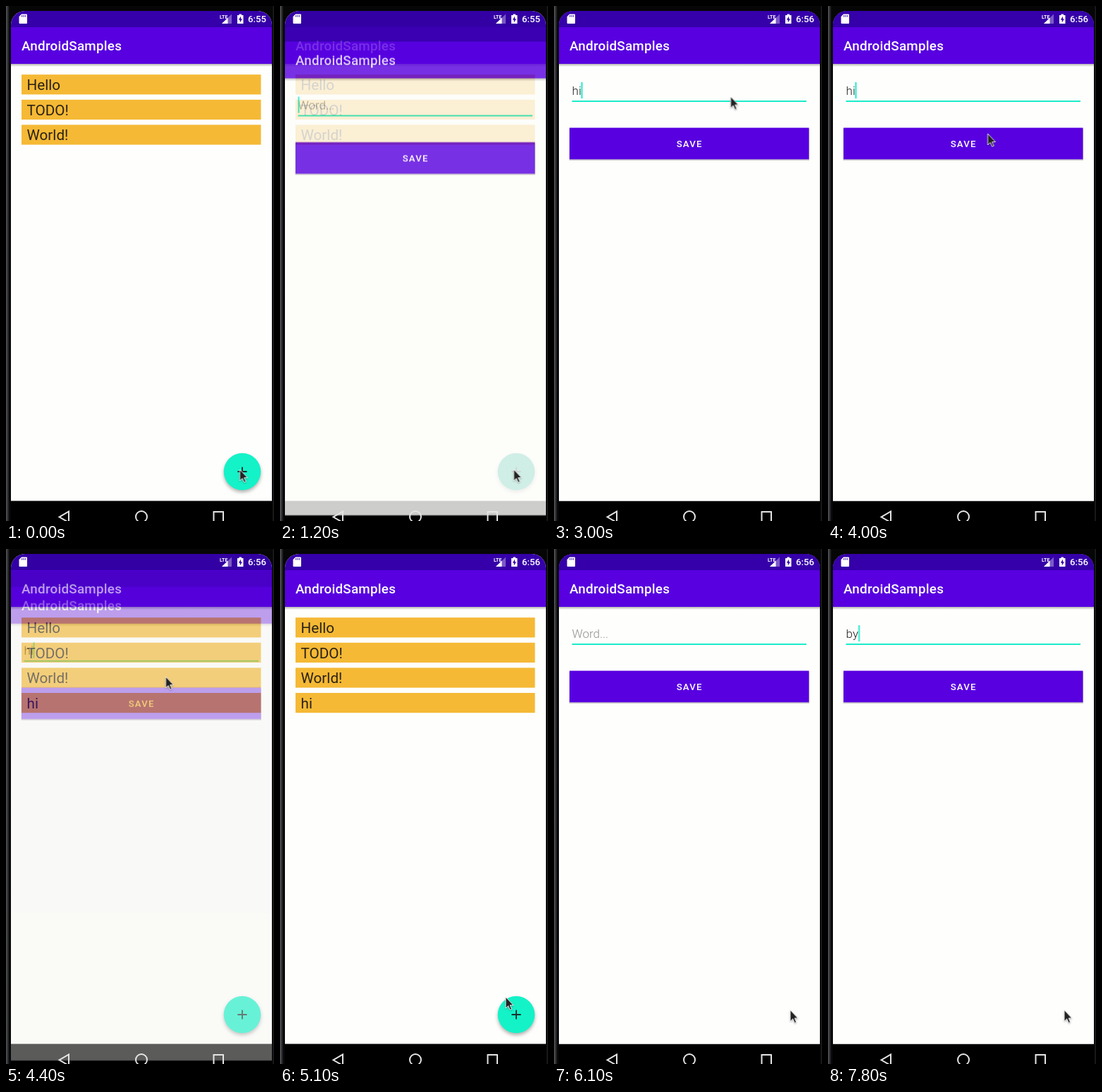
Recreate the animation shown at these times as an HTML page. Size 380 px wide and 730 px high, loop 8000 ms.

```html
<!DOCTYPE html>
<html lang="en">
<head>
<meta charset="utf-8">
<title>Word list app</title>
<style>
html, body { margin: 0; width: 100%; height: 100%; overflow: hidden; background: #060607; }
svg { display: block; width: 380px; height: 730px; font-family: Roboto, sans-serif; }

.title { font-size: 18.84px; font-weight: 500; letter-spacing: .0125em; fill: #fff; }
.item rect { fill: #f5b935; }
.item text { font-size: 20.7px; fill: #2a2212; }
.field { font-size: 16.96px; font-weight: 300; fill: #222; }
.hint { fill: #8f918e; }
.save { font-size: 13.2px; font-weight: 500; letter-spacing: .0892em; fill: #fff; }
.clock { font-size: 13.2px; font-weight: 500; fill: #fff; }
.lte { font-size: 7px; font-weight: 700; fill: #fff; }
.fab { filter: drop-shadow(0 3px 2.5px rgba(0, 0, 0, .3)); }

/* Everything changes in hard steps of 100 ms; 1.25% = 100 ms */
.editor, .caret, .hint, .h, .i, .b, .y, .new, .veil, .press, .lift, .before, .after, .pointer {
  animation: 8s step-end infinite;
}
.editor { animation-name: slide; opacity: 0; }
.caret { animation-name: caret; }
.hint { animation-name: hint; }
.h { animation-name: h; }
.i { animation-name: i; }
.b { animation-name: b; }
.y { animation-name: y; }
.h, .i, .b, .y, .new, .after { visibility: hidden; }
.new { animation-name: added; }
.veil { animation-name: veil; opacity: 0; }
.press { animation-name: press; opacity: 0; }
.lift { animation-name: lift; opacity: .2; }
.before { animation-name: before; }
.after { animation-name: after; }
.pointer { animation-name: pointer; }

@keyframes slide {
  0% { opacity: 0; transform: none; }
  15% { opacity: .81; transform: translateY(20.5px); }
  16.25% { opacity: 1; transform: translateY(2.3px); }
  17.5% { transform: none; }
  53.75% { opacity: 1; transform: translateY(1.5px); }
  55% { opacity: .36; transform: translateY(23.7px); }
  56.25% { opacity: 0; transform: none; }
  71.25% { opacity: .67; transform: translateY(28px); }
  72.5% { opacity: .98; transform: translateY(3.7px); }
  73.75%, 100% { opacity: 1; transform: none; }
}
@keyframes caret {
  0% { opacity: 1; transform: none; }
  20% { opacity: 0; }
  26.25% { opacity: 1; }
  32.5% { transform: translateX(9px); }
  37.5% { transform: translateX(13px); }
  40% { opacity: 0; }
  46.25% { opacity: 1; }
  56.25% { transform: none; }
  76.25% { opacity: 0; }
  82.5% { opacity: 1; }
  88.75% { opacity: 0; }
  95% { opacity: 1; transform: translateX(9px); }
  97.5%, 100% { opacity: 1; transform: translateX(17.6px); }
}
@keyframes hint {
  0%, 56.25% { visibility: visible; }
  32.5%, 95%, 100% { visibility: hidden; }
}
@keyframes h {
  0%, 56.25%, 100% { visibility: hidden; }
  32.5% { visibility: visible; }
}
@keyframes i {
  0%, 56.25%, 100% { visibility: hidden; }
  37.5% { visibility: visible; }
}
@keyframes b { 95%, 100% { visibility: visible; } }
@keyframes y { 97.5%, 100% { visibility: visible; } }
@keyframes added { 50%, 100% { visibility: visible; } }
@keyframes before { 17.5%, 100% { visibility: hidden; } }
@keyframes after { 17.5%, 100% { visibility: visible; } }
@keyframes veil {
  0%, 16.25%, 56.25%, 72.5%, 100% { opacity: 0; }
  15%, 55%, 71.25% { opacity: .03; }
}
@keyframes press {
  0%, 17.5%, 73.75%, 100% { opacity: 0; }
  11.25%, 68.75% { opacity: .1; }
  12.5%, 70% { opacity: .2; }
  13.75%, 71.25% { opacity: .27; }
}
@keyframes lift {
  0%, 56.25%, 100% { opacity: .2; }
  51.25% { opacity: .28; }
  52.5% { opacity: .34; }
}
@keyframes pointer {
  0% { transform: translate(331.5px, 657px); }
  17.5% { transform: translate(315px, 540px); }
  18.75% { transform: translate(280px, 265px); }
  20% { transform: translate(260px, 141px); }
  22.5% { transform: translate(250.5px, 128.5px); }
  45% { transform: translate(249px, 133px); }
  46.25% { transform: translate(244px, 150px); }
  47.5% { transform: translate(236px, 168px); }
  48.75% { transform: translate(229px, 178px); }
  50% { transform: translate(226.5px, 181px); }
  58.75% { transform: translate(228px, 192px); }
  60% { transform: translate(240px, 260px); }
  61.25% { transform: translate(268px, 410px); }
  62.5% { transform: translate(300px, 560px); }
  63.75% { transform: translate(320px, 635px); }
  65% { transform: translate(329px, 662px); }
  66.25% { transform: translate(331px, 665px); }
  73.75%, 100% { transform: translate(335px, 653.5px); }
}
</style>
</head>
<body>
<svg viewBox="0 0 380 730">
  <defs>
    <clipPath id="glass"><rect x="7" y="7" width="370" height="760" rx="20"/></clipPath>
    <linearGradient id="edge">
      <stop offset="0" stop-color="#55575a"/>
      <stop offset=".45" stop-color="#333437"/>
      <stop offset="1" stop-color="#060607"/>
    </linearGradient>
    <linearGradient id="fade" x2="0" y2="1">
      <stop offset="0" stop-opacity=".3"/>
      <stop offset="1" stop-opacity="0"/>
    </linearGradient>
    <g id="page">
      <rect x="7" y="7" width="370" height="694.5" fill="#fefefc"/>
      <rect x="7" y="82" width="370" height="4" fill="url(#fade)"/>
      <rect x="7" y="7" width="370" height="23.5" fill="#3500a9"/>
      <rect x="7" y="30" width="370" height="52" fill="#5800e0"/>
      <text class="title" x="22" y="63">AndroidSamples</text>
    </g>
  </defs>

  <rect width="380" height="730" fill="#060607"/>
  <rect width="5" height="730" fill="url(#edge)"/>
  <rect x="378.5" width="1.5" height="730" fill="#1b1c1e"/>

  <g clip-path="url(#glass)">
    <rect x="7" y="7" width="370" height="723" fill="#000"/>

    <g>
      <use href="#page"/>
      <g class="item">
        <rect x="22" y="97.2" width="339.5" height="28.2"/>
        <text x="29.5" y="119">Hello</text>
      </g>
      <g class="item" transform="translate(0 35.6)">
        <rect x="22" y="97.2" width="339.5" height="28.2"/>
        <text x="29.5" y="119">TODO!</text>
      </g>
      <g class="item" transform="translate(0 71.2)">
        <rect x="22" y="97.2" width="339.5" height="28.2"/>
        <text x="29.5" y="119">World!</text>
      </g>
      <g class="item new" transform="translate(0 106.8)">
        <rect x="22" y="97.2" width="339.5" height="28.2"/>
        <text x="29.5" y="119">hi</text>
      </g>
      <circle class="fab" cx="335" cy="660" r="26.3" fill="#14f2c8"/>
      <circle class="press" cx="335" cy="660" r="26.3"/>
      <path d="M328.4 660h13.2M335 653.4v13.2" stroke="#15332c" stroke-width="1.9"/>
      <rect class="veil" x="7" y="7" width="370" height="694.5"/>
    </g>

    <g class="editor">
      <use href="#page"/>
      <text class="field hint" x="25.6" y="126">Word...</text>
      <text class="field" x="25.6" y="126"><tspan class="h">h</tspan><tspan class="i">i</tspan></text>
      <text class="field" x="25.6" y="126"><tspan class="b">b</tspan><tspan class="y">y</tspan></text>
      <rect x="25.5" y="134" width="332.5" height="2" fill="#1cebcb"/>
      <rect class="caret" x="25.5" y="108" width="2" height="23" fill="#1cebcb"/>
      <rect class="lift" x="21.5" y="174" width="340.5" height="45"/>
      <rect x="22" y="172.6" width="339.5" height="44.7" fill="#5800e0"/>
      <text class="save" x="173.7" y="200">SAVE</text>
    </g>

    <g fill="#fff">
      <path d="M22 11.5h7q1 0 1 1v11.500q0 1-1 1h-9.500q-1 0-1-1v-9z"/>
      <path d="M22.700 13v2.500M25 13v2.500M27.300 13v2.500" stroke="#3500a9"/>
      <text class="lte" x="303" y="17.500" textLength="auto">LTE</text>
      <path d="M306 25L320 11.500V25z" opacity=".35"/>
      <path d="M306 25L314.500 16.800V25z"/>
      <path d="M330.500 11.500h3.500v1.500h2.500v12h-8.500v-12h2.500z"/>
      <path d="M333 14.500l-3.200 5.200h2v3.800l3.200-5.200h-2z" fill="#3500a9"/>
      <text class="clock before" x="343" y="23.200">6:55</text>
      <text class="clock after" x="343" y="23.200">6:56</text>
    </g>

    <g fill="none" stroke="#e4e4e4" stroke-width="2">
      <path d="M75.500 724.300L89 716.500v15.600z"/>
      <circle cx="192" cy="724" r="8"/>
      <rect x="294.500" y="717" width="13.500" height="14"/>
    </g>
  </g>

  <path class="pointer" d="M0 0V16L3.700 12.600L6.200 18.300L8.700 17.200L6.200 11.700H11Z"
    fill="#222" stroke="#fff" stroke-width=".9" style="filter: drop-shadow(0 1px 1px rgba(0, 0, 0, .3))"/>
</svg>
</body>
</html>
```
